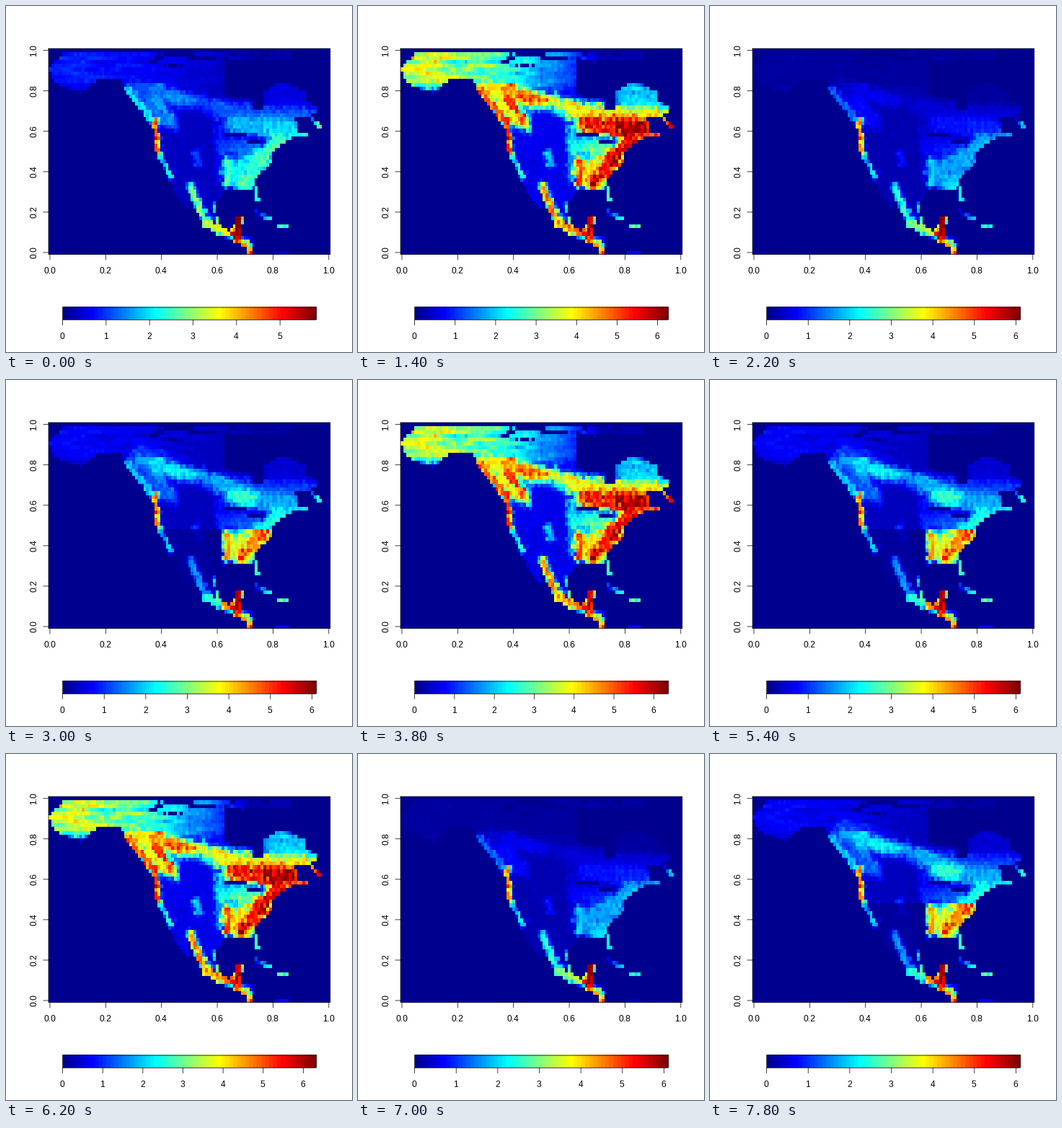
Recreate the animation shown at these times as a matplotlib script. Size 480 by 480 pixels, loop 8 s.

```python
import numpy as np
import matplotlib.pyplot as plt
from matplotlib.animation import FuncAnimation
from matplotlib.colors import ListedColormap
from matplotlib.path import Path

SIZE, DPI = 480, 72
FRAMES, STEP = 40, 200
COLS, ROWS = 101, 54
LEFT, RIGHT, TOP, BOTTOM = 59.04, 449.76, 59.04, 344.64
BAR_L, BAR_R, BAR_T, BAR_B = 78.58, 430.22, 418.08, 435.36
CELL_W, CELL_H = (RIGHT - LEFT) / COLS, (BOTTOM - TOP) / ROWS

plt.rcParams["font.family"] = "Liberation Sans"
plt.rcParams["font.size"] = 12

# Rainbow of three overlapping trapezoids, red, green and blue
steps = np.arange(64)
RAINBOW = ListedColormap(np.column_stack(
    [np.clip(1.5 - abs(steps - c) / 16, 0, 1) for c in (47, 31, 15)]))

# Cell centres in stage pixels
X, Y = np.meshgrid(LEFT + (np.arange(COLS) + 0.5) * CELL_W,
                   TOP + (np.arange(ROWS) + 0.5) * CELL_H)

# Fixed grain: fine per cell, streaky along the rows
rng = np.random.default_rng(11)
fine = rng.normal(size=X.shape)
streak = np.array([np.convolve(row, np.ones(9) / 3, "same")
                   for row in rng.normal(size=X.shape)])
WX = X + 1.5 * rng.normal(size=X.shape)
WY = Y + 1.5 * rng.normal(size=X.shape)


def distance(x, y, x0, y0, x1, y1):
    dx, dy = x1 - x0, y1 - y0
    t = np.clip(((x - x0) * dx + (y - y0) * dy) / (dx * dx + dy * dy), 0, 1)
    return np.hypot(x - x0 - t * dx, y - y0 - t * dy)


def band(x0, y0, x1, y1, r):
    """Flat-topped soft weight along a segment with ragged edges."""
    return np.exp(-(distance(WX, WY, x0, y0, x1, y1) / r) ** 4)


winter = np.full(X.shape, 0.22)
summer = np.full(X.shape, 0.7)


def grow(weight, low, high):
    """Blend a plant cover into the winter and summer fields."""
    for field, level in ((winter, low), (summer, high)):
        field += (level - field) * weight


# Tundra thins out to the east, forest crosses the continent
grow(np.clip((118 - WY) / 10, 0, 1), 0.15,
     np.clip(3.4 * (1 - ((X - 60) / 285) ** 2), 0.2, 4))
grow(band(372, 122, 410, 128, 17), 0.15, 2.1)
grow(band(180, 116, 290, 142, 14), 0.4, 3.9)
grow(band(290, 144, 440, 155, 13), 0.5, 4.0)
grow(band(208, 118, 255, 132, 9), 0.6, 4.6)
grow(band(195, 135, 228, 160, 13), 0.7, 3.7)
grow(band(208, 128, 240, 172, 4), 0.7, 5.2)

# Dry plains and basins
grow(band(294, 170, 297, 235, 8), 0.5, 2.1)
grow(band(262, 167, 272, 290, 27), 0.25, 0.6)
grow(band(230, 195, 245, 250, 17), 0.25, 0.6)
grow(band(263, 203, 267, 220, 5), 0.8, 2.0)

# Eastern woods
grow(band(316, 166, 400, 168, 14), 0.8, 5.4)
grow(band(362, 172, 395, 170, 10), 0.9, 6.1)
grow(band(306, 195, 342, 197, 12), 0.8, 2.7)
grow(band(325, 232, 352, 218, 22), 1.7, 4.0)
grow(band(328, 246, 378, 185, 11), 1.7, 5.7)
grow(band(307, 214, 306, 246, 6), 2.0, 5.2)
grow(band(372, 197, 438, 165, 9), 1.7, 5.3)

# Pacific rim, Mexico, isthmus and islands
grow(band(168, 116, 205, 160, 5), 1.3, 4.8)
grow(band(206, 160, 210, 205, 5), 4.4, 5.2)
grow(band(212, 208, 230, 238, 4), 2.2, 2.6)
grow(band(257, 250, 275, 298, 6), 2.4, 4.5)
grow(band(278, 304, 318, 315, 8), 3.2, 4.6)
grow(band(292, 276, 297, 300, 5), 2.6, 2.9)
grow(band(320, 324, 340, 345, 10), 4.2, 4.4)
grow(band(323, 294, 321, 317, 7), 6.0, 5.7)
grow(band(347, 254, 385, 304, 16), 2.3, 2.8)

coast = [(304, 64), (304, 124), (340, 130), (342, 142), (356, 144), (358, 120),
         (371, 109), (396, 109), (414, 120), (415, 134), (430, 138), (430, 151),
         (404, 153), (402, 178), (384, 191), (371, 199), (366, 218), (346, 241),
         (352, 271), (347, 271), (344, 252), (304, 254), (291, 273), (290, 286),
         (299, 308), (311, 311), (320, 292), (329, 291), (326, 319), (341, 321),
         (342, 346), (336, 346), (333, 334), (297, 319), (272, 304), (258, 268),
         (251, 248), (255, 282), (250, 282), (222, 236), (206, 196), (206, 172),
         (166, 118), (160, 101), (128, 100), (104, 121), (68, 107), (59, 88),
         (80, 64)]
cells = np.column_stack([X.ravel(), Y.ravel()])
land = Path(coast).contains_points(cells).reshape(X.shape)
land &= (X < 200) | (Y > 84) | (streak > -0.9)
land |= (X > 300) & (X < 395) & (Y < 86) & (streak > 0.5)
land &= Y > TOP + CELL_H

for isle in ((347, 286, 367, 296), (379, 304, 390, 304), (374, 342, 390, 342),
             (424, 157, 436, 169), (404, 179, 416, 177)):
    land |= distance(X, Y, *isle) < 3
for lake in ((306, 176, 332, 179), (338, 187, 352, 190), (404, 158, 416, 161)):
    land &= distance(X, Y, *lake) > 3

north = np.clip((125 - Y) / 30, 0, 1)
grain = 1 + fine * (0.08 - 0.03 * north) + streak * (0.03 + 0.1 * north)
grain = np.clip(grain, 0.5, 1.5) * land
winter *= grain
summer *= grain

# By April the south-east is nearly green, the dry south-west is still fading
early = np.where(Y < 208, 0.16, np.where(X > 298, 0.75, -0.4))
early = early + 0.22 * band(190, 105, 335, 162, 16) * (Y < 208)
spring = winter + early * (summer - winter)
first = winter + 0.2 * (summer - winter)

SEASONS = (spring, summer, winter)
SUMMER_PEAKS = (6.26, 6.36, 6.32)


def season(k):
    peak = SUMMER_PEAKS[k // 3 % 3] if k % 3 == 1 else 6.1
    return SEASONS[k % 3], peak


def state(i):
    """Leaf field and scale maximum at month i."""
    if i < 3:
        t, (a, peak_a), (b, peak_b) = i / 3, (first, 5.83), season(0)
    else:
        k, t = divmod((i - 3) / 4, 1)
        (a, peak_a), (b, peak_b) = season(int(k)), season(int(k) + 1)
    t = t * t * (3 - 2 * t)
    return a + (b - a) * t, peak_a + (peak_b - peak_a) * t


fig = plt.figure(figsize=(SIZE / DPI, SIZE / DPI), dpi=DPI, facecolor="white")
ax = fig.add_axes([0, 0, 1, 1])
ax.axis("off")


def line(xs, ys):
    return ax.plot(xs, ys, color="black", lw=0.75, snap=False, zorder=3)[0]


def label(x, y, text, angle=0):
    return ax.text(x, y, text, rotation=angle, rotation_mode="anchor",
                   ha="center", va="baseline")


def panel(data, l, r, t, b):
    line([l, r, r, l, l], [t, t, b, b, t])
    return ax.imshow(data, cmap=RAINBOW, aspect="auto", interpolation="nearest",
                     extent=(l, r, b, t))


leaf = panel(first, LEFT, RIGHT, TOP, BOTTOM)
panel(steps[None], BAR_L, BAR_R, BAR_T, BAR_B)

for n in range(6):
    x = LEFT + CELL_W / 2 + (RIGHT - LEFT - CELL_W) * n / 5
    y = BOTTOM - CELL_H / 2 - (BOTTOM - TOP - CELL_H) * n / 5
    line([x, x], [BOTTOM, BOTTOM + 7.2])
    line([LEFT - 7.2, LEFT], [y, y])
    label(x - 0.5, 371, f"{n / 5:.1f}")
    label(42.5, y - 0.5, f"{n / 5:.1f}", 90)

ticks = [(line([0, 0], [BAR_B, BAR_B + 7.2]), label(0, 462, str(n)))
         for n in range(7)]
ax.set_xlim(0, SIZE)
ax.set_ylim(SIZE, 0)


def update(i):
    field, peak = state(i)
    leaf.set_data(field)
    leaf.set_clim(0, peak)
    for n, (mark, text) in enumerate(ticks):
        x = BAR_L + (BAR_R - BAR_L) * n / peak
        mark.set_xdata([x, x])
        text.set_x(x - 0.5)
        mark.set_visible(n <= peak)
        text.set_visible(n <= peak)
    return [leaf]


anim = FuncAnimation(fig, update, frames=FRAMES, interval=STEP, repeat=True,
                     repeat_delay=0, blit=False)
plt.show()
```
